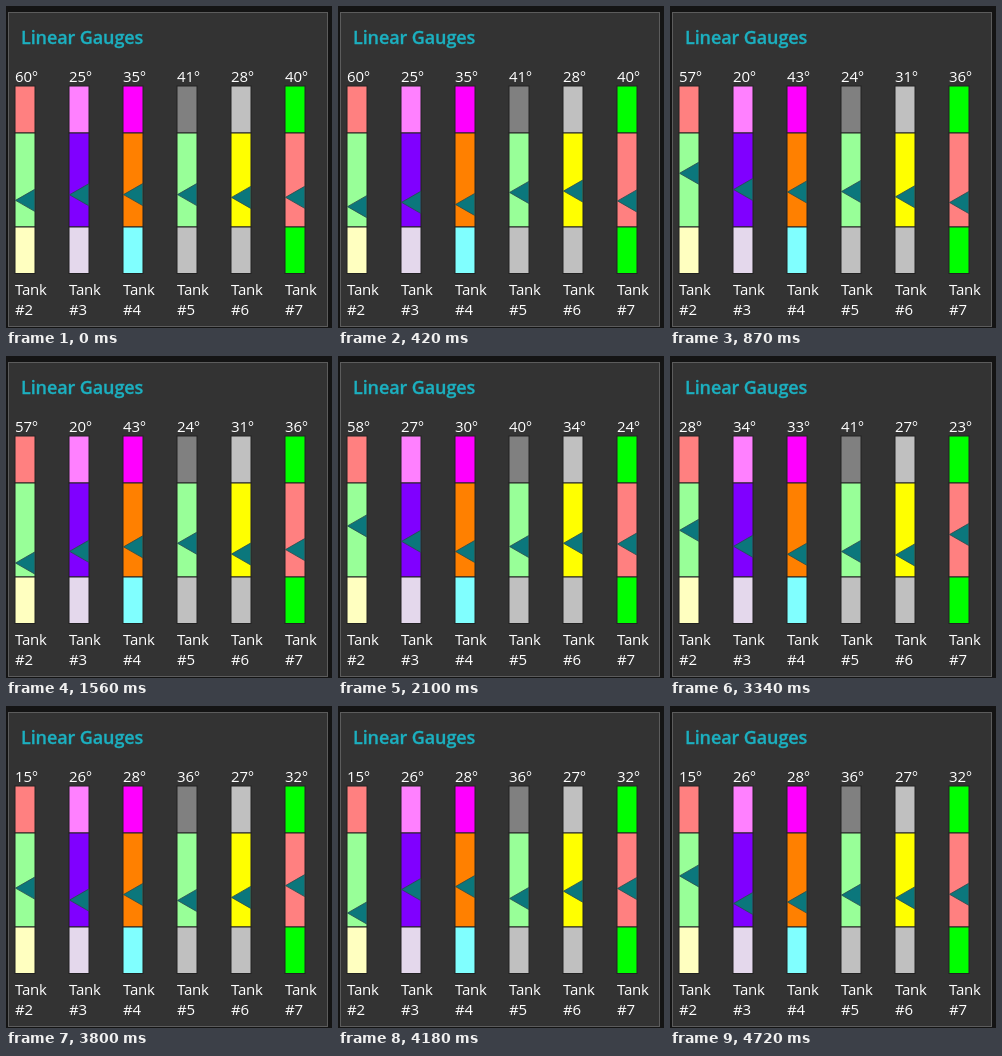
These frames come from a looping animation (326 px wide and 322 px high, 4800 ms). An HTML page:

```html
<!DOCTYPE html>
<html lang="en">
<head>
<meta charset="utf-8">
<title>Linear Gauges</title>
<style>
  html, body { margin: 0; width: 100%; height: 100%; overflow: hidden; background: #141414; }
  svg { display: block; }
  text { font: 15px "Open Sans", "Noto Sans", sans-serif; letter-spacing: -.2px; fill: #fff; }
  .title { font-size: 18px; font-weight: 600; letter-spacing: -.1px; fill: #1cb0c0; stroke: #1cb0c0; stroke-width: .3; }
  .panel { fill: #333; stroke: #5c5c5c; }
  .band { stroke: #222; }
  .pointer { fill: #0b777c; stroke: #2b4a4c; stroke-width: .8; }
</style>
</head>
<body>
<svg id="stage" width="326" height="322" viewBox="0 0 326 322">
  <rect class="panel" x="2.5" y="6.5" width="319" height="314"/>
  <text class="title" x="15" y="38">Linear Gauges</text>
</svg>
<script>
const LOOP = 4.8;
const EDGES = [80, 127, 221, 267.5];

// Each pointer swings around mid; low is a moment (s) when it is lowest on the stage
const tanks = [
  { bands: ['#ff8080', '#98ff98', '#ffffc0'], reads: [60, 57, 58, 28, 15],
    mid: 187, swing: 20, period: 1.31, low: 1.56 },
  { bands: ['#ff80ff', '#8000ff', '#e4d8ec'], reads: [25, 20, 27, 34, 26],
    mid: 190.5, swing: 7, period: 1.1, low: 1.42 },
  { bands: ['#ff00ff', '#ff8000', '#80ffff'], reads: [35, 43, 30, 33, 28],
    mid: 189.5, swing: 9, period: 1.5, low: 3.4 },
  { bands: ['#808080', '#98ff98', '#c0c0c0'], reads: [41, 24, 40, 41, 36],
    mid: 190.5, swing: 5, period: 4.8, low: 3.3 },
  { bands: ['#c0c0c0', '#ffff00', '#c0c0c0'], reads: [28, 31, 34, 27, 27],
    mid: 192, swing: 7, period: 1.9, low: 1.4 },
  { bands: ['#00ff00', '#ff8080', '#00ff00'], reads: [40, 36, 24, 23, 32],
    mid: 187.5, swing: 9, period: 5, low: 0.9 }
];

const stage = document.getElementById('stage');

function add(tag, attrs, content = '') {
  const el = document.createElementNS('http://www.w3.org/2000/svg', tag);
  for (const key in attrs) el.setAttribute(key, attrs[key]);
  el.textContent = content;
  return stage.appendChild(el);
}

tanks.forEach((tank, i) => {
  const x = tank.x = 9 + 54 * i;
  tank.bands.forEach((fill, b) => add('rect', {
    class: 'band', fill, x, width: 20, y: EDGES[b], height: EDGES[b + 1] - EDGES[b]
  }));
  tank.pointer = add('path', { class: 'pointer', d: 'M.5 0L19.7 -11V11Z' });
  tank.label = add('text', { x, y: 75.5 });
  add('text', { x, y: 289 }, 'Tank');
  add('text', { x, y: 309 }, '#' + (i + 2));
});

function draw() {
  const t = performance.now() / 1000 % LOOP;
  const reading = Math.floor(t + 0.2);
  for (const { x, mid, swing, period, low, pointer, label, reads } of tanks) {
    const y = mid + swing * Math.cos(2 * Math.PI * (t - low) / period);
    pointer.setAttribute('transform', `translate(${x} ${y})`);
    label.textContent = reads[reading] + '°';
  }
  requestAnimationFrame(draw);
}
draw();
</script>
</body>
</html>
```
